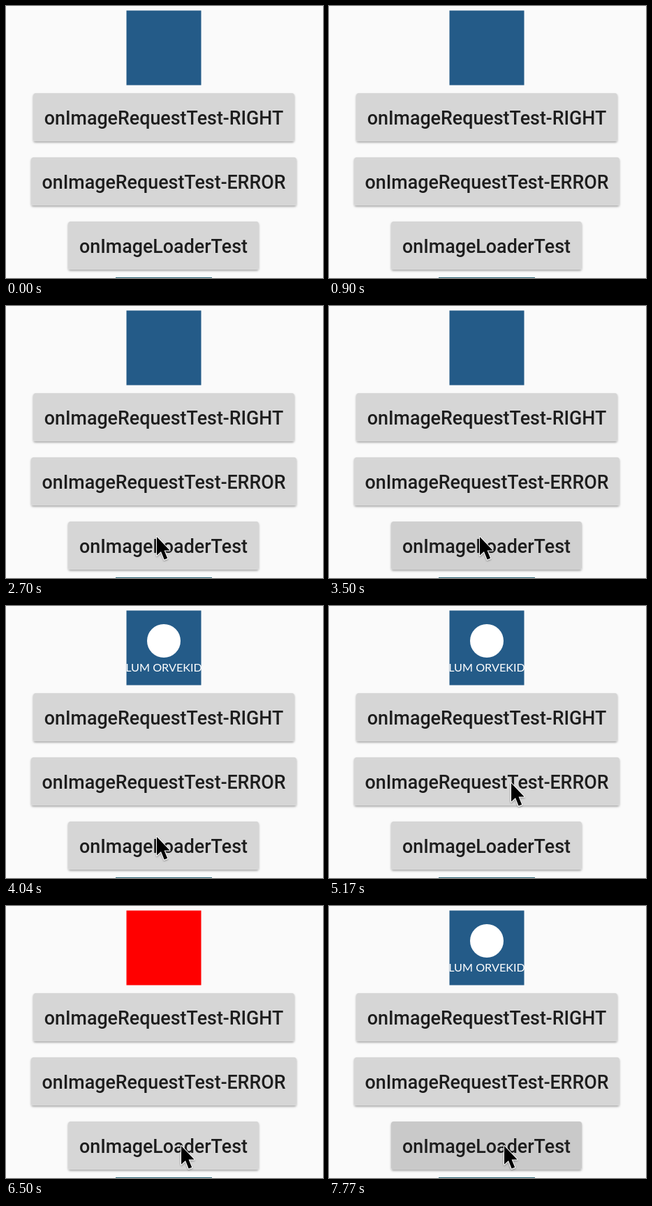
Write an HTML page that moves like this. It is 454 px wide and 390 px high and loops after 8000 ms.

```html
<!DOCTYPE html>
<html lang="en">
<head>
<meta charset="utf-8">
<title>Image loading demo</title>
<style>
  html, body { margin: 0; width: 100%; height: 100%; overflow: hidden; background: #fafafa; }
  svg { display: block; width: 454px; height: 390px; }
  .label { font: 500 26.83px Roboto, sans-serif; fill: #1d1d1d; text-anchor: middle; }
  .caption { font: 400 16.2px Lato, sans-serif; fill: #fff; text-anchor: middle; }
</style>
</head>
<body>
<svg viewBox="0 0 454 390">
  <defs>
    <filter id="lift" x="-5%" y="-15%" width="110%" height="140%">
      <feDropShadow dx="0" dy="1.8" stdDeviation="1.5" flood-opacity=".32"/>
    </filter>
    <filter id="soft" x="-30%" y="-20%" width="170%" height="150%">
      <feDropShadow dx="0" dy="1.2" stdDeviation="1" flood-opacity=".35"/>
    </filter>
  </defs>
  <rect width="454" height="390" fill="#fafafa"/>
  <rect id="picture" x="172.5" y="6.5" width="107" height="107"/>
  <g id="loaded">
    <circle cx="226" cy="50" r="24" fill="#fff"/>
    <text class="caption" x="226" y="94">LUM ORVEKID</text>
  </g>
  <g id="buttons"></g>
  <rect x="157" y="389" width="138" height="1" fill="#2b6777"/>
  <path id="cursor" d="M1 1V27.5L7 22L11.6 33.6L16.2 31.8L11.6 20.6H19.6Z"
        stroke="#fff" stroke-width="2" stroke-linejoin="round" paint-order="stroke" filter="url(#soft)"/>
</svg>
<script>
const LOOP = 8000;
const BLUE = '#245b88', RED = '#f00';
const byId = id => document.getElementById(id);
const picture = byId('picture'), loaded = byId('loaded'), cursor = byId('cursor');

function addButton(text, x, y, width) {
  const group = document.createElementNS('http://www.w3.org/2000/svg', 'g');
  group.innerHTML =
    `<rect x="${x}" y="${y}" width="${width}" height="69" rx="3.5" filter="url(#lift)"/>
     <text class="label" x="${x + width / 2}" y="${y + 44.5}">${text}</text>`;
  byId('buttons').append(group);
  return group.firstChild;
}

addButton('onImageRequestTest-RIGHT', 39, 125, 374).setAttribute('fill', '#d6d6d6');
const errorButton = addButton('onImageRequestTest-ERROR', 36, 217, 380);
const loaderButton = addButton('onImageLoaderTest', 89, 309, 273);

// Latest value whose start time has passed.
const valueAt = (track, t) => track.reduce((value, [start, next]) => t >= start ? next : value, null);

const errorFill = [[0, '#d6d6d6'], [5700, '#cacaca'], [5770, '#cfcfcf'], [5900, '#d6d6d6']];
const loaderFill = [
  [0, '#d6d6d6'], [3440, '#cacaca'], [3500, '#d0d0d0'], [3570, '#d6d6d6'],
  [7440, '#d2d2d2'], [7640, '#cfcfcf'], [7700, '#cccccc'], [7770, '#c9c9c9']
];
const pictureState = [[0, 'blank'], [4040, 'loaded'], [5770, 'error'], [7440, 'loaded']];

// Each move advances in discrete steps; sag bends the path downwards.
const moves = [
  { start: 840, end: 1370, steps: 8, from: [316, 402], to: [402, 321], sag: 0 },
  { start: 2440, end: 2700, steps: 5, from: [402, 321], to: [215, 330], sag: 12 },
  { start: 4900, end: 5170, steps: 5, from: [215, 330], to: [260, 253], sag: 0 },
  { start: 6240, end: 6500, steps: 5, from: [260, 253], to: [250, 343], sag: 0 }
];

function cursorAt(t) {
  if (t >= 500 && t < 570) return [22, 330];
  const move = moves.filter(m => t >= m.start).pop();
  if (!move) return null;
  const { start, end, steps, from, to, sag } = move;
  const step = Math.floor((t - start + 1) / (end - start) * (steps - 1)) + 1;
  const p = Math.min(1, step / steps);
  const eased = p * p * (3 - 2 * p);
  const mix = i => from[i] + (to[i] - from[i]) * eased;
  return [mix(0), mix(1) + sag * Math.sin(Math.PI * eased)];
}

function draw(t) {
  const state = valueAt(pictureState, t);
  picture.setAttribute('fill', state === 'error' ? RED : BLUE);
  loaded.style.display = state === 'loaded' ? '' : 'none';
  errorButton.setAttribute('fill', valueAt(errorFill, t));
  loaderButton.setAttribute('fill', valueAt(loaderFill, t));
  const tip = cursorAt(t);
  cursor.style.display = tip ? '' : 'none';
  if (tip) cursor.setAttribute('transform', `translate(${tip})`);
}

const origin = performance.now();
function tick(now) {
  draw(Math.max(0, now - origin) % LOOP);
  requestAnimationFrame(tick);
}
draw(0);
requestAnimationFrame(tick);
</script>
</body>
</html>
```
